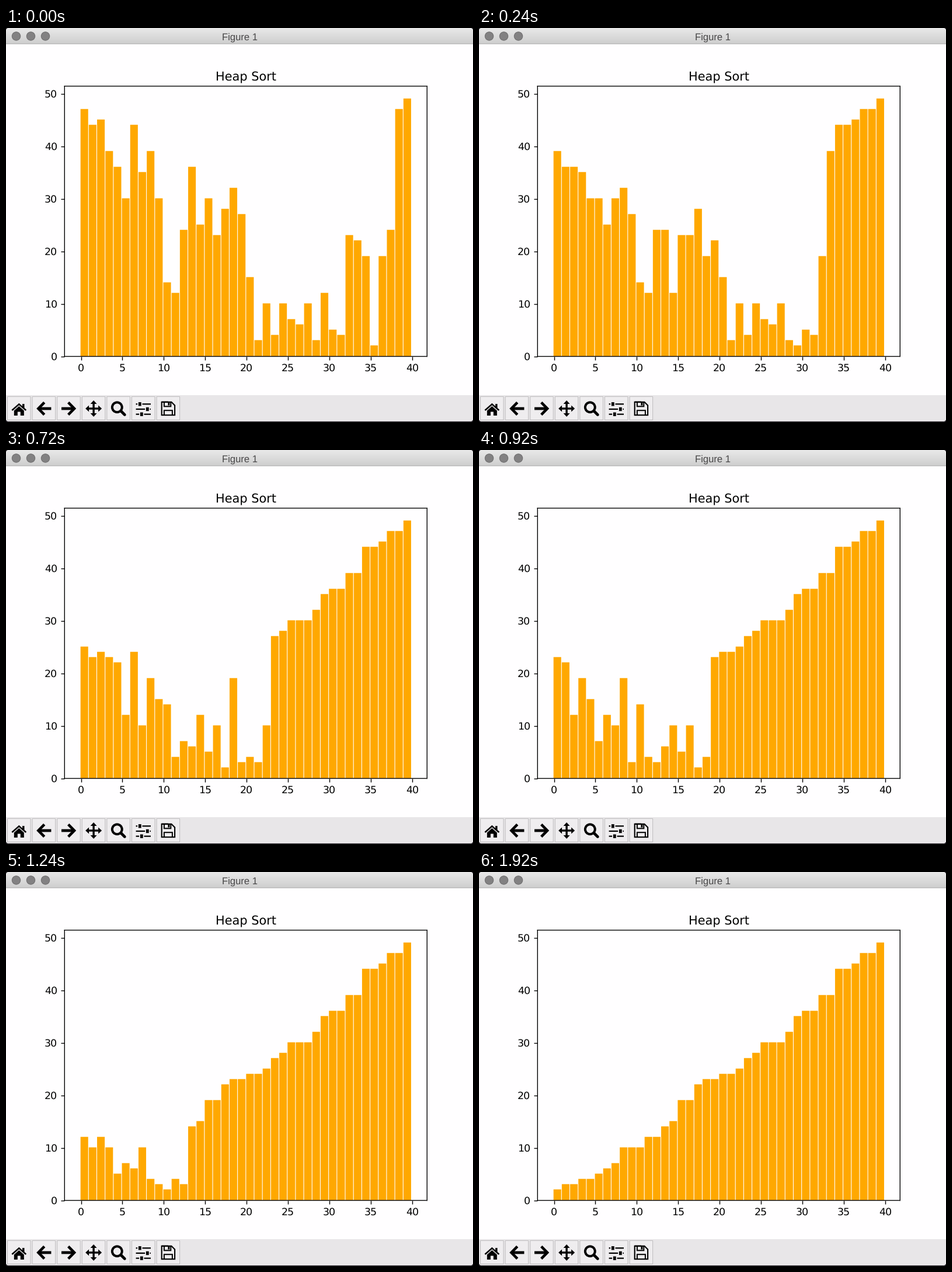
These frames come from a looping animation (800 px wide and 675 px high, 1.96 s). A matplotlib script:

```python
import numpy as np
import matplotlib.pyplot as plt
from matplotlib.animation import FuncAnimation
from matplotlib.patches import Circle, FancyBboxPatch, Polygon, Rectangle

W, H, DPI = 800, 675, 125
TICKS, INTERVAL = 49, 40
PX = 72 / DPI  # points per pixel
INK, PAPER, BUTTON, ORANGE = "black", "#fffeff", "#efedef", "#ffa800"

# The numbers to sort: a heap whose two largest are already in place.
DATA = [47, 44, 45, 39, 36, 30, 44, 35, 39, 30, 14, 12, 24, 36, 25, 30, 23, 28, 32, 27,
        15, 3, 10, 4, 10, 7, 6, 10, 3, 12, 5, 4, 23, 22, 19, 2, 19, 24, 47, 49]
SORTED = 2


def sift_down(a, size, i=0):
    while (child := 2 * i + 1) < size:
        if child + 1 < size and a[child + 1] > a[child]:
            child += 1
        if a[child] <= a[i]:
            return
        a[i], a[child] = a[child], a[i]
        i = child


def sort_states(data):
    a = list(data)
    yield a[:]
    for end in range(len(a) - SORTED - 1, 0, -1):
        a[0], a[end] = a[end], a[0]
        sift_down(a, end)
        yield a[:]


STATES = list(sort_states(DATA))


def state_at(tick):
    """Sorting runs a little slower than the ticks and loses some pace."""
    step = int(0.03 + 0.861 * tick - 0.00156 * tick ** 2)
    return STATES[min(step, len(STATES) - 1)]


plt.rcParams.update({"font.family": "DejaVu Sans", "path.snap": False,
                     "text.hinting": "none"})
fig = plt.figure(figsize=(W / DPI, H / DPI), dpi=DPI, facecolor="#1d1a1f")

# Window chrome, in pixels with y pointing down.
win = fig.add_axes([0, 0, 1, 1])
win.set_axis_off()


def line(points, width, cap="butt"):
    x, y = zip(*points)
    win.plot(x, y, color=INK, lw=width * PX, solid_capstyle=cap, solid_joinstyle="miter")


def rect(x, y, w, h, color, edge="none"):
    return win.add_patch(Rectangle((x, y), w, h, fc=color, ec=edge, lw=PX, zorder=2))


def block(cx, cy, w, h, color=INK):
    rect(cx - w / 2, cy - h / 2, w, h, color)


def poly(points):
    win.add_patch(Polygon(points, fc=INK, ec="none", zorder=3))


def draw_window():
    frame = FancyBboxPatch((5, 5), W - 10, H - 11, boxstyle="round,pad=5,rounding_size=5",
                           fc=PAPER, ec="none", zorder=0)
    win.add_patch(frame)
    shade = np.linspace(0.91, 0.81, 27)[:, None, None].repeat(3, axis=2)
    win.imshow(shade, extent=(0, W, 27, 0), aspect="auto", zorder=1).set_clip_path(frame)
    rect(0, 26.5, W, 1.2, "#b3b1b3")
    rect(0, 629, W, H - 629, "#e8e6e8").set_clip_path(frame)
    for i in range(3):
        win.add_patch(Circle((17.5 + 25 * i, 14), 7.2, fc="#828182", ec="#6d6c6d",
                             lw=PX, zorder=3))
    win.text(W / 2, 20, "Figure 1", family="Liberation Sans", size=16.6 * PX,
             color="#484748", ha="center", va="baseline")


def home(x, y):
    line([(x - 12, y + 3), (x, y - 7.5), (x + 12, y + 3)], 2.6)
    half = [(0, -4), (8.5, 3.5), (8.5, 12), (2.5, 12), (2.5, 5.5)]
    poly([(x + dx, y + dy) for dx, dy in half]
         + [(x - dx, y + dy) for dx, dy in reversed(half)])
    block(x + 7.5, y - 4.5, 3.4, 7)


def arrow(x, y, way):
    tip = x + 9.5 * way
    line([(tip - 10.3 * way, y - 10.5), (tip, y), (tip - 10.3 * way, y + 10.5)], 4.6)
    line([(tip - way, y), (tip - 22 * way, y)], 4.8)


def back(x, y):
    arrow(x, y, -1)


def forward(x, y):
    arrow(x, y, 1)


def move(x, y):
    for dx, dy in ((1, 0), (-1, 0), (0, 1), (0, -1)):
        bx, by = x + 8 * dx, y + 8 * dy
        line([(x, y), (bx, by)], 3.4)
        poly([(x + 14 * dx, y + 14 * dy), (bx + 5.5 * dy, by + 5.5 * dx),
              (bx - 5.5 * dy, by - 5.5 * dx)])


def zoom(x, y):
    win.add_patch(Circle((x - 2.4, y - 2.2), 8.4, fc="none", ec=INK, lw=4 * PX, zorder=3))
    line([(x + 4, y + 4), (x + 10.6, y + 10.6)], 4.8, cap="round")


def sliders(x, y):
    for row, knob in zip((-1, 0, 1), (-6, 7, -3)):
        ry = y + 1 + 8.7 * row
        line([(x - 12.7, ry), (x + 12.7, ry)], 2.2)
        block(x + knob, ry, 8.4, 4, BUTTON)
        block(x + knob, ry, 4.8, 6.4)


def disk(x, y, r=11.2, cut=5.7):
    line([(x - r, y - r), (x + r - cut, y - r), (x + r, y - r + cut), (x + r, y + r),
          (x - r, y + r), (x - r, y - r), (x, y - r)], 2.1)
    for x1, side, depth in ((x + 4.4, -1, 7.5), (x + 7, 1, 8)):
        edge = y + side * r
        inner = edge - side * depth
        line([(x - 7, edge), (x - 7, inner), (x1, inner), (x1, edge)], 2)
    block(x + 1, y - 8, 3, 5)


draw_window()
for i, icon in enumerate((home, back, forward, move, zoom, sliders, disk)):
    cx = 22.3 + 42.6 * i
    rect(cx - 19.8, 631.5, 39.5, 40, BUTTON, "#bfbdbf")
    icon(cx, 652)
win.set(xlim=(0, W), ylim=(H, 0))

# Chart
left, right, top, bottom = 100.3, 721.3, 99.6, 562.6
ax = fig.add_axes([left / W, 1 - bottom / H, (right - left) / W, (bottom - top) / H],
                  facecolor=PAPER)
bars = ax.bar(range(len(DATA)), DATA, align="edge", color=ORANGE, edgecolor=ORANGE,
              linewidth=1)
ax.set_title("Heap Sort")


def update(tick):
    for bar, value in zip(bars, state_at(tick)):
        bar.set_height(value)
    return bars


anim = FuncAnimation(fig, update, frames=TICKS, interval=INTERVAL,
                     repeat=True, repeat_delay=0, blit=False)
plt.show()
```
